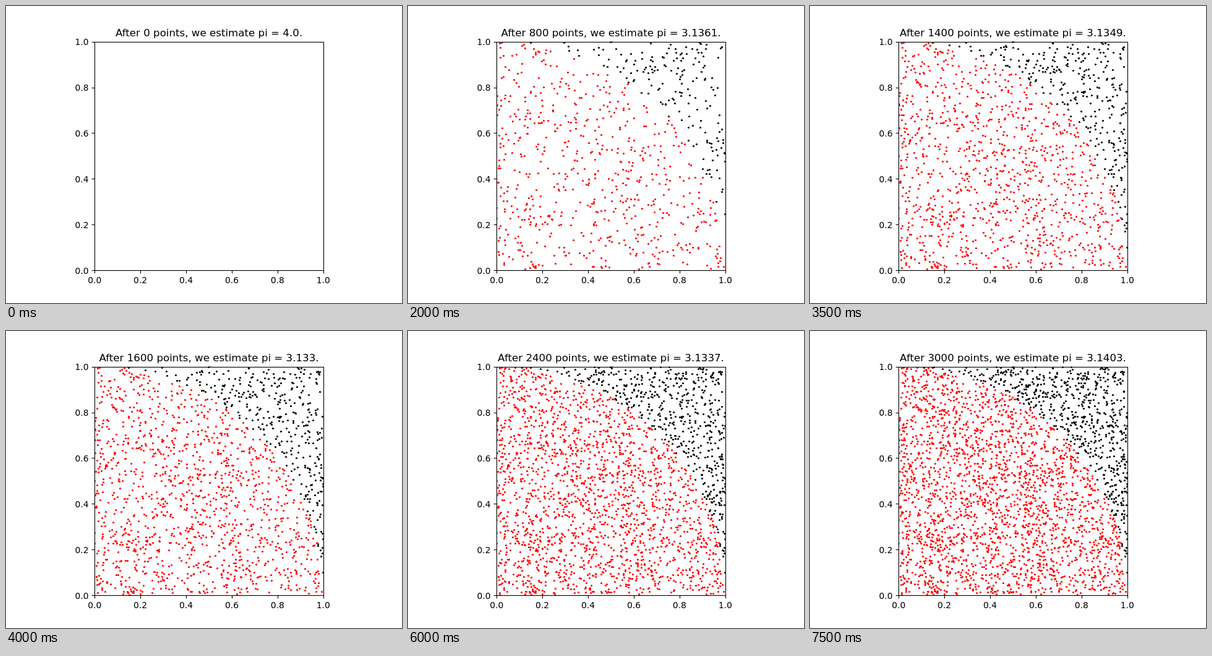
An HTML page with a canvas that plays this animation: 640x480 px, repeating every 8000 ms.

```html
<!DOCTYPE html>
<html lang="en">
<head>
<meta charset="utf-8">
<title>Monte Carlo estimate of pi</title>
<style>
  html, body { margin: 0; width: 100%; height: 100%; overflow: hidden; background: #fff; }
  canvas { display: block; }
</style>
</head>
<body>
<canvas id="stage" width="640" height="480"></canvas>
<script>
const ctx = document.getElementById('stage').getContext('2d');
const LEFT = 143.2, BOTTOM = 427.2, SIZE = 369.6;
const STEP_MS = 500, BATCH = 200;
// Points inside the quarter circle after each batch; the first point counts as hit.
const hits = [1, 157, 313, 470, 628, 785, 941, 1098, 1254, 1414, 1574, 1727, 1881, 2034, 2195, 2356];

const toX = u => LEFT + u * SIZE;
const toY = v => BOTTOM - v * SIZE;
const snap = p => Math.floor(p + 0.5) + 0.5;

let seed = 31415;
function random() {
  seed = (seed + 0x6D2B79F5) | 0;
  let t = Math.imul(seed ^ (seed >>> 15), 1 | seed);
  t = (t + Math.imul(t ^ (t >>> 7), 61 | t)) ^ t;
  return ((t ^ (t >>> 14)) >>> 0) / 4294967296;
}

// Random batches, each holding exactly its share of hits.
const batches = hits.map((total, i) => {
  const batch = [];
  if (!i) return batch;
  let inside = total - hits[i - 1], outside = BATCH - inside;
  while (inside + outside > 0) {
    const u = random(), v = random(), hit = u * u + v * v < 1;
    if (hit ? inside-- > 0 : outside-- > 0) batch.push({ u, v, hit });
    inside = Math.max(inside, 0);
    outside = Math.max(outside, 0);
  }
  return batch;
});

function line(x1, y1, x2, y2) {
  ctx.beginPath();
  ctx.moveTo(x1, y1);
  ctx.lineTo(x2, y2);
  ctx.stroke();
}

function text(str, x, y, size, align) {
  ctx.font = `${size}px "DejaVu Sans", sans-serif`;
  ctx.textAlign = align;
  ctx.fillText(str, x, y);
}

function drawAxes() {
  const x0 = snap(toX(0)), x1 = snap(toX(1)), y0 = snap(toY(0)), y1 = snap(toY(1));
  ctx.fillStyle = ctx.strokeStyle = '#000';
  ctx.lineWidth = 1.11;
  ctx.strokeRect(x0, y1, x1 - x0, y0 - y1);
  for (let i = 0; i <= 5; i++) {
    const value = i / 5, label = value.toFixed(1), x = toX(value), y = toY(value);
    line(snap(x), y0, snap(x), y0 + 4.86);
    line(x0 - 4.86, snap(y), x0, snap(y));
    text(label, x, 448, 13.889, 'center');
    text(label, 133.5, Math.round(y + 5.4), 13.889, 'right');
  }
}

function drawPoints(step) {
  ctx.save();
  ctx.beginPath();
  ctx.rect(LEFT, toY(1), SIZE, SIZE);
  ctx.clip();
  for (const { u, v, hit } of batches.slice(0, step + 1).flat()) {
    ctx.fillStyle = hit ? '#f00' : '#000';
    ctx.beginPath();
    ctx.arc(Math.floor(toX(u)) + 0.5, Math.floor(toY(v)) + 0.5, 1.6, 0, 2 * Math.PI);
    ctx.fill();
  }
  ctx.restore();
}

function draw(step) {
  ctx.fillStyle = '#fff';
  ctx.fillRect(0, 0, 640, 480);
  drawPoints(step);
  drawAxes();
  const count = step * BATCH;
  const pi = +(4 * hits[step] / (count + 1)).toFixed(4);
  const shown = Number.isInteger(pi) ? pi.toFixed(1) : pi;
  text(`After ${count} points, we estimate pi = ${shown}.`, 328, 49, 16.667, 'center');
}

const start = performance.now();
let current = -1;
function tick() {
  const step = Math.floor((performance.now() - start) / STEP_MS) % hits.length;
  if (step !== current) draw(current = step);
  requestAnimationFrame(tick);
}
tick();
</script>
</body>
</html>
```
